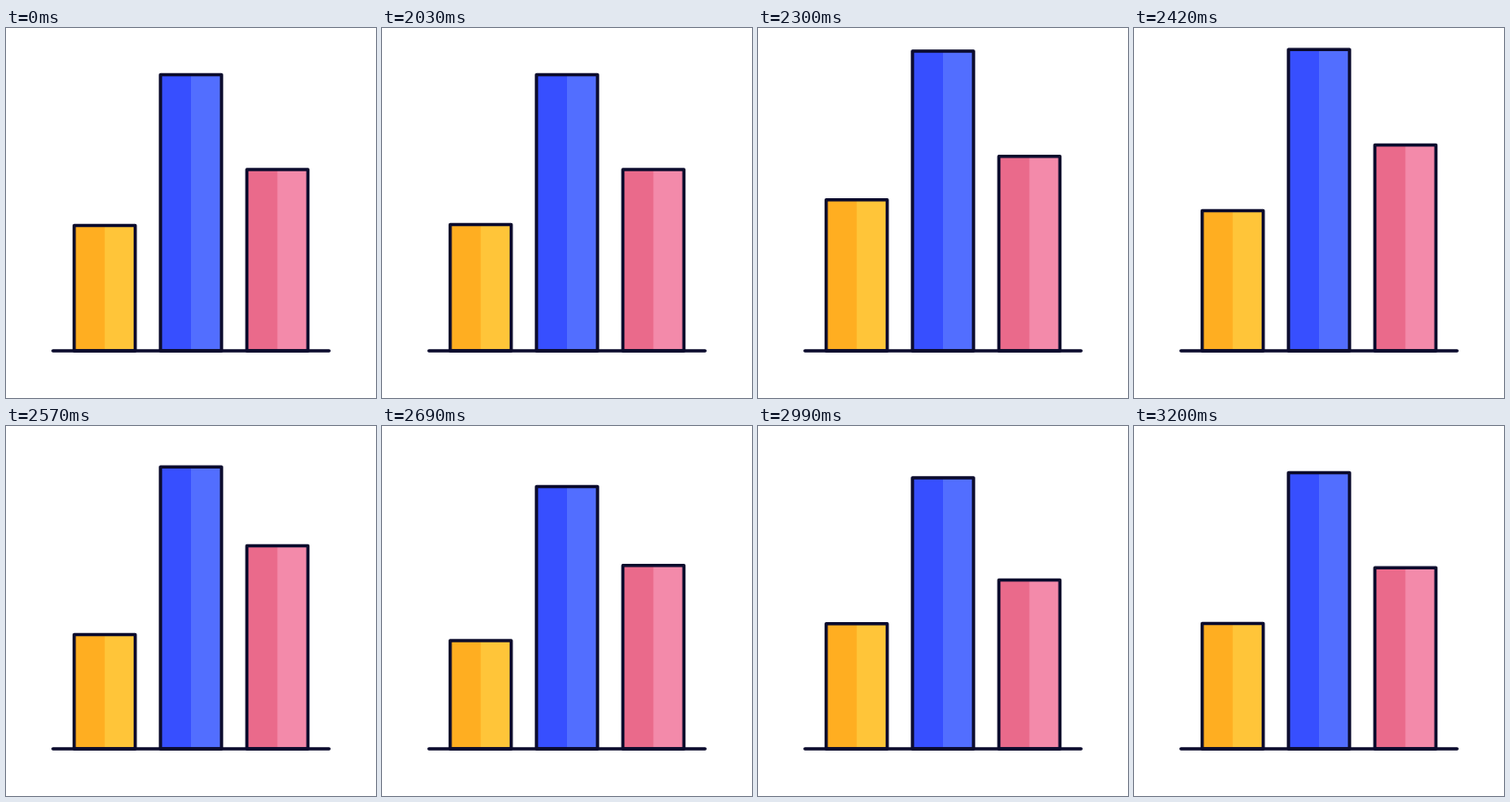
Write an HTML page that moves like this. It is 400x400 px and loops after 3.23 s.

```html
<!DOCTYPE html>
<html lang="en">
<head>
<meta charset="utf-8">
<title>Bar chart</title>
<style>
  html, body { margin: 0; width: 100%; height: 100%; overflow: hidden; background: #fff; }
  svg { display: block; width: 100%; height: 100%; }
</style>
</head>
<body>
<svg id="stage" viewBox="0 0 400 400">
  <g id="bars"></g>
  <path d="M50.8 349H349.2" fill="none" stroke="#0b0b2d" stroke-width="3.5" stroke-linecap="round"/>
</svg>
<script>
const LOOP = 3230, START = 2030, STEP = 30;
const BASE = 349, HALF = 33;
const UP = 27.6, DOWN = -19;

// x: centre, top: resting height, delay: in steps
const bars = [
  { x: 106.7, top: 213.4, delay: 0, dark: '#ffae21', light: '#ffc539' },
  { x: 200, top: 50.6, delay: 10 / 3, dark: '#374fff', light: '#526eff' },
  { x: 293.4, top: 153, delay: 20 / 3, dark: '#ea6a8b', light: '#f38aaa' }
];

function add(parent, name, attrs) {
  const el = document.createElementNS('http://www.w3.org/2000/svg', name);
  for (const key in attrs) el.setAttribute(key, attrs[key]);
  return parent.appendChild(el);
}

const group = document.getElementById('bars');
for (const bar of bars) {
  const left = bar.x - HALF;
  bar.parts = [
    add(group, 'rect', { x: left, width: HALF * 2, fill: bar.light }),
    add(group, 'rect', { x: left, width: HALF, fill: bar.dark }),
    add(group, 'rect', {
      x: left, width: HALF * 2, fill: 'none',
      stroke: '#0b0b2d', 'stroke-width': 3.5, 'stroke-linejoin': 'round'
    })
  ];
}

const sine = u => (1 - Math.cos(Math.PI * u)) / 2;
const mix = (a, b, u) => a + (b - a) * u;

// cubic-bezier(.37, 0, .17, 1)
function swift(x) {
  let lo = 0, hi = 1;
  for (let i = 0; i < 24; i++) {
    const s = (lo + hi) / 2, r = 1 - s;
    if (1.11 * s * r * r + 0.51 * s * s * r + s * s * s < x) lo = s;
    else hi = s;
  }
  return lo * lo * (3 - 2 * lo);
}

// Stretch up, dip below, settle
function lift(k) {
  if (k <= 0 || k >= 34) return 0;
  if (k < 10) return UP * swift(k / 10);
  if (k < 22) return mix(UP, DOWN, sine((k - 10) / 12));
  return mix(DOWN, 0, sine((k - 22) / 12));
}

function draw(ms) {
  const t = ms % LOOP;
  const k = t < START ? 0 : Math.floor((t - START) / STEP) + 1;
  for (const bar of bars) {
    const y = bar.top - lift(k - bar.delay);
    for (const part of bar.parts) {
      part.setAttribute('y', y.toFixed(2));
      part.setAttribute('height', (BASE - y).toFixed(2));
    }
  }
}

const begin = performance.now();
function tick() {
  draw(performance.now() - begin);
  requestAnimationFrame(tick);
}
draw(0);
requestAnimationFrame(tick);
</script>
</body>
</html>
```
